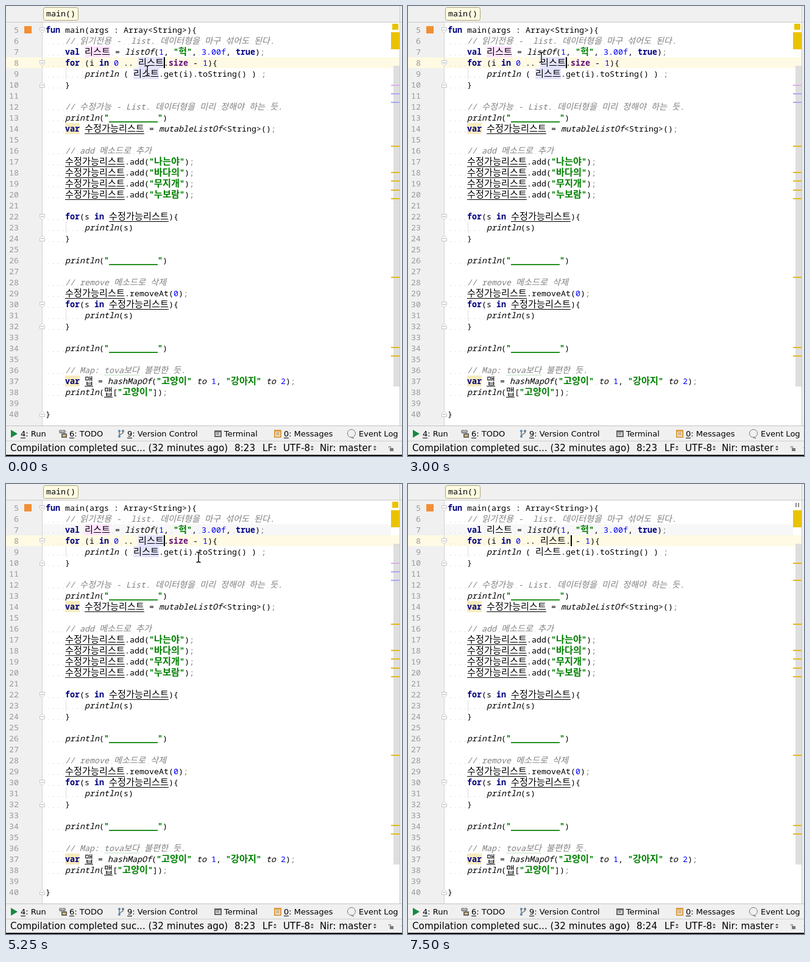
An HTML page with a canvas that plays this animation: 650 px wide and 738 px high, repeating every 8 s.

```html
<!DOCTYPE html>
<html lang="ko">
<head>
<meta charset="utf-8">
<title>Code editor</title>
<style>
html, body { margin: 0; width: 100%; height: 100%; overflow: hidden; background: #f0f0f0; }
canvas { display: block; }
</style>
</head>
<body>
<canvas id="stage" width="650" height="738"></canvas>
<script>
const ctx = document.getElementById('stage').getContext('2d');
const MONO = '"Noto Sans Mono", "DejaVu Sans Mono", monospace';
const HANGUL = '"Noto Sans CJK KR", "Noto Sans CJK", sans-serif';
const UI = '"DejaVu Sans", sans-serif';
const FIRST = 5, ROW = 18, LEFT = 65, CELL = 8;
const YELLOW = '#e0bb18', BLUE = '#a9a9f0', PURPLE = '#dcb0e6';

// One cell of the code grid is 8 px wide
ctx.font = '100px ' + MONO;
const monoSize = 100 * CELL / ctx.measureText('0').width;

const code = `fun main(args : Array<String>){
    // 읽기전용 -  list. 데이터형을 마구 섞어도 된다.
    val 리스트 = listOf(1, "헉", 3.00f, true);
    for (i in 0 .. 리스트.size - 1){
        println ( 리스트.get(i).toString() ) ;
    }

    // 수정가능 - List. 데이터형을 미리 정해야 하는 듯.
    println("__________")
    var 수정가능리스트 = mutableListOf<String>();

    // add 메소드로 추가
    수정가능리스트.add("나는야");
    수정가능리스트.add("바다의");
    수정가능리스트.add("무지개");
    수정가능리스트.add("누보람");

    for(s in 수정가능리스트){
        println(s)
    }

    println("__________")

    // remove 메소드로 삭제
    수정가능리스트.removeAt(0);
    for(s in 수정가능리스트){
        println(s)
    }

    println("__________")

    // Map: tova보다 불편한 듯.
    var 맵 = hashMapOf("고양이" to 1, "강아지" to 2);
    println(맵["고양이"]);

}`.split('\n');

const styles = {
  comment: { color: '#808080', italic: true },
  string: { color: '#008000', bold: true },
  keyword: { color: '#000080', bold: true },
  property: { color: '#660e7a', bold: true },
  call: { color: '#000', italic: true },
  number: { color: '#0000ff' },
  mutable: { color: '#000', underline: true },
  muted: { color: '#808080' },
  plain: { color: '#000' }
};
const tokenPattern = new RegExp([
  '(?<comment>//.*)', '(?<string>"[^"]*")', '(?<keyword>\\b(?:fun|val|var|for|in|true)\\b)',
  '(?<property>\\bsize\\b)', '(?<call>\\b(?:println|listOf|mutableListOf|hashMapOf|to)\\b)',
  '(?<number>\\d+(?:\\.\\d+f)?)', '(?<mutable>수정가능리스트|맵)', '(?<muted>;)', '(?<plain>\\w+|[^])'
].join('|'), 'g');

const rowTop = line => 30 + (line - FIRST) * ROW;

function rect(color, x, y, w, h) {
  ctx.fillStyle = color;
  ctx.fillRect(x, y, w, h);
}

function text(str, x, y, size, color = '#000', family = UI) {
  ctx.font = `${size}px ${family}`;
  ctx.fillStyle = color;
  ctx.fillText(str, x, y);
}

function shape(points, fill, stroke) {
  ctx.beginPath();
  points.forEach(([x, y]) => ctx.lineTo(x, y));
  ctx.closePath();
  if (fill) { ctx.fillStyle = fill; ctx.fill(); }
  if (stroke) { ctx.strokeStyle = stroke; ctx.stroke(); }
}

function polyline(color, width, points) {
  ctx.beginPath();
  points.forEach(([x, y]) => ctx.lineTo(x, y));
  ctx.strokeStyle = color;
  ctx.lineWidth = width;
  ctx.stroke();
  ctx.lineWidth = 1;
}

function disc(color, x, y, r) {
  ctx.beginPath();
  ctx.arc(x, y, r, 0, 7);
  ctx.fillStyle = color;
  ctx.fill();
}

function drawCode(source, line, forcedColor) {
  let x = LEFT;
  const top = rowTop(line), base = top + 14;
  for (const match of source.matchAll(tokenPattern)) {
    const kind = Object.keys(match.groups).find(name => match.groups[name] !== undefined);
    const style = styles[kind];
    const hangulWidth = kind === 'comment' ? 13 : 14;
    const start = x;
    if (match[0] === 'var' && !forcedColor) rect('#f6ebbc', x, top, 24, ROW);
    for (const run of match[0].match(/[가-힣]+|[^가-힣]+/g)) {
      const hangul = /[가-힣]/.test(run);
      const size = hangul ? hangulWidth / 0.92 : monoSize;
      const face = `${style.italic ? 'italic ' : ''}${style.bold ? 'bold ' : ''}`;
      ctx.font = `${face}${size}px ${hangul ? HANGUL : MONO}`;
      ctx.fillStyle = forcedColor || style.color;
      ctx.fillText(run, x, base);
      if (!hangul) [...run].forEach((char, i) => {
        if (char === ' ') rect('#c8c8c8', x + i * CELL + 4, base, 1, 1);
      });
      x += run.length * (hangul ? hangulWidth : CELL);
    }
    if (style.underline) rect(forcedColor || '#000', start, base + 3, x - start, 1);
  }
}

function drawFold(line, closing) {
  const y = rowTop(line) + 9.5, d = closing ? -1 : 1;
  shape([[55.5, y - 4 * d], [63.5, y - 4 * d], [63.5, y + d], [59.5, y + 5 * d], [55.5, y + d]], '#fff', '#c4c4c4');
  rect('#b0b0b0', 57, y - 0.5, 5, 1);
}

function drawSorter(x) {
  shape([[x, 724], [x + 5, 724], [x + 2.5, 721]], '#444');
  shape([[x, 726], [x + 5, 726], [x + 2.5, 729]], '#444');
}

function drawBulb(line) {
  const y = rowTop(line);
  disc('#edab3c', 79, y + 4, 5.3);
  rect('#edab3c', 76, y + 7, 6, 3);
  rect('#777', 76, y + 10, 6, 1);
  rect('#777', 77, y + 12, 4, 1);
}

function drawPointer([x, y]) {
  for (const [color, width] of [['#fff', 3], ['#000', 1.4]]) {
    polyline(color, width, [[x, y - 7], [x, y + 7]]);
    for (const d of [-1, 1])
      polyline(color, width, [[x - 3.5, y + 8.5 * d], [x - 1, y + 8 * d], [x, y + 7 * d], [x + 1, y + 8 * d], [x + 3.5, y + 8.5 * d]]);
  }
}

function drawToolbar() {
  rect('#f0f0f0', 0, 688, 650, 50);
  rect('#c4c4c4', 0, 688, 650, 1);
  rect('#cfcfcf', 0, 713, 650, 1);
  rect('#000', 0, 736, 650, 2);
  const labels = [['4: Run', 24], ['6: TODO', 104], ['9: Version Control', 199],
    ['Terminal', 358], ['0: Messages', 456], ['Event Log', 579]];
  for (const [label, x] of labels) {
    text(label, x, 706, 13);
    if (label[1] === ':') rect('#000', x, 708, 8, 1);
  }
  shape([[8, 695], [8, 708], [19, 701.5]], '#168a43');

  disc('#8a8a8a', 90, 698, 3);
  disc('#8a8a8a', 95, 698, 3);
  rect('#e9e1c8', 89, 697, 7, 1);
  rect('#666', 91, 701, 9, 7);
  rect('#e8c36a', 93, 703, 5, 3);

  polyline('#777', 1.5, [[186, 698], [186, 706]]);
  polyline('#777', 1.5, [[186, 704], [192, 700], [192, 697]]);
  disc('#4d8bbb', 186, 697, 2);
  disc('#4d8bbb', 186, 706, 2);
  disc('#777', 192, 697, 2);

  rect('#666', 342, 696, 12, 11);
  rect('#ddd', 344, 699, 8, 6);
  rect('#666', 345, 700, 5, 1);
  rect('#666', 345, 702, 5, 1);

  rect('#d99d43', 440, 695, 12, 13);
  rect('#f7edda', 442, 698, 8, 8);
  for (const y of [699, 701, 703]) rect('#b38a50', 443, y, 6, 1);

  ctx.beginPath();
  ctx.arc(567, 701, 6.5, 2.2, 8);
  ctx.lineTo(571, 709);
  ctx.closePath();
  ctx.strokeStyle = '#777';
  ctx.stroke();
}

function drawStatus({ position, chars }) {
  const size = 15.2, base = 730;
  text(`Compilation co${chars ? '' : 'mpleted suc'}... (32 minutes ago)`, 7, base, size);
  if (chars) text(`${chars} chars`, 294, base, size);
  text(position, 375, base, size);
  text('LF', 421, base, size);
  text('UTF-8', 455, base, size);
  text('Nir: master', 515, base, size);
  [439, 500, 603].forEach(drawSorter);
  rect('#777', 630, 725, 6, 5);
  polyline('#777', 1, [[628.5, 725], [628.5, 722.5], [631.5, 722.5], [631.5, 725]]);
  rect('#999', 649, 724, 1, 1);
}

function drawStripe({ marks, busy }) {
  rect('#f0f0f0', 646, 27, 4, 661);
  rect('#c9c9c9', 646, 0, 1, 688);
  rect('#dedede', 636, 98, 10, 526);
  if (busy) {
    rect('#888', 636, 31, 2, 7);
    rect('#888', 640, 31, 2, 7);
  } else rect('#eac300', 634, 29, 10, 10);
  rect('#eac300', 632, 43, 14, 28);
  for (const y of [229, 272, 286, 301, 315, 444, 559, 573]) rect(YELLOW, 632, y, 14, 2);
  marks.forEach((color, i) => color && rect(color, 632, 129 + 14 * i, 14, 2));
}

const used = [PURPLE, BLUE, BLUE], unused = [YELLOW, null, YELLOW], partial = [YELLOW, BLUE, YELLOW];
const base = { line: 8, usages: true, marks: used };
const idle = { line: 8, usages: false, marks: unused };
const nameSelected = { ...base, line: 7, caret: 171, faded: 8, selection: [129, 171], chars: 3, position: '7:12' };
const tailSelected = { ...idle, marks: partial, faded: 7, pointer: [316, 120] };
const states = [
  { ...base, caret: 259, pointer: [232, 106], position: '8:23' },
  { ...base, caret: 177, pointer: [182, 92], position: '8:15' },
  { ...idle, bulb: 8, pointer: [239, 97], position: '8:15' },
  { ...base, caret: 245, pointer: [239, 97], position: '8:22' },
  { ...base, caret: 259, pointer: [219, 84], position: '8:23' },
  { ...nameSelected, pointer: [144, 76] },
  { ...nameSelected, bulb: 7, pointer: [262, 94] },
  { ...base, caret: 259, faded: 7, pointer: [316, 120], position: '8:23' },
  { ...tailSelected, caret: 283, selection: [259, 283], chars: 3, position: '8:26' },
  { ...tailSelected, caret: 299, selection: [259, 299], chars: 5, position: '8:28' },
  { ...idle, caret: 267, faded: 7, busy: true, position: '8:24' }
];

function draw(state) {
  rect('#fff', 0, 0, 650, 738);
  rect('#f0f0f0', 0, 0, 60, 688);
  rect('#f0f0f0', 0, 0, 650, 26);
  rect('#c9c9c9', 0, 26, 650, 1);
  ctx.beginPath();
  ctx.roundRect(61.5, 2.5, 57, 21, 3);
  ctx.fillStyle = '#fdfae0';
  ctx.fill();
  ctx.strokeStyle = '#aaa27a';
  ctx.stroke();
  text('main()', 66, 17, monoSize, '#000', MONO);

  if (state.faded) rect('#f7f7f7', 60, rowTop(state.faded), 572, ROW);
  rect('#fffae3', 0, rowTop(state.line), 646, ROW);
  rect('#d4d4d4', 59, 27, 1, 661);
  if (state.usages) {
    rect('#ffe4ff', 129, rowTop(7), 42, ROW);
    rect('#e4e4ff', 217, rowTop(8), 42, ROW);
    rect('#e4e4ff', 209, rowTop(9), 42, ROW);
  }
  for (const line of [9, 23, 31]) rect('#dedede', 98, rowTop(line), 1, ROW);

  const sourceAt = line => state.busy && line === 8
    ? code[line - FIRST].replace('size', '') : code[line - FIRST];
  code.forEach((_, i) => {
    const line = i + FIRST;
    ctx.textAlign = 'right';
    text(line, 21, rowTop(line) + 14, monoSize, '#999', MONO);
    ctx.textAlign = 'left';
    drawCode(sourceAt(line), line);
  });
  const wave = Array.from({ length: 30 }, (_, i) => [161 + 2 * i, 604.5 + i % 2 * 1.5]);
  polyline('#b9dcb9', 1, wave);

  if (state.selection) {
    const [from, to] = state.selection;
    ctx.save();
    ctx.beginPath();
    ctx.rect(from, rowTop(state.line), to - from, ROW);
    ctx.clip();
    rect('#526da5', from, rowTop(state.line), to - from, ROW);
    drawCode(sourceAt(state.line), state.line, '#fff');
    ctx.restore();
  }

  rect('#f18e33', 30, 33, 12, 12);
  [5, 8, 22, 30].forEach(line => drawFold(line, false));
  [10, 24, 32, 40].forEach(line => drawFold(line, true));
  drawStripe(state);
  drawToolbar();
  drawStatus(state);
  if (state.bulb) drawBulb(state.bulb);
  if (state.caret) rect('#000', state.caret, rowTop(state.line), 2, ROW);
  if (state.pointer) drawPointer(state.pointer);
}

const began = performance.now();
function tick() {
  const time = (performance.now() - began) % 8000;
  draw(states[Math.floor(time / 750)]);
  requestAnimationFrame(tick);
}
tick();
</script>
</body>
</html>
```
